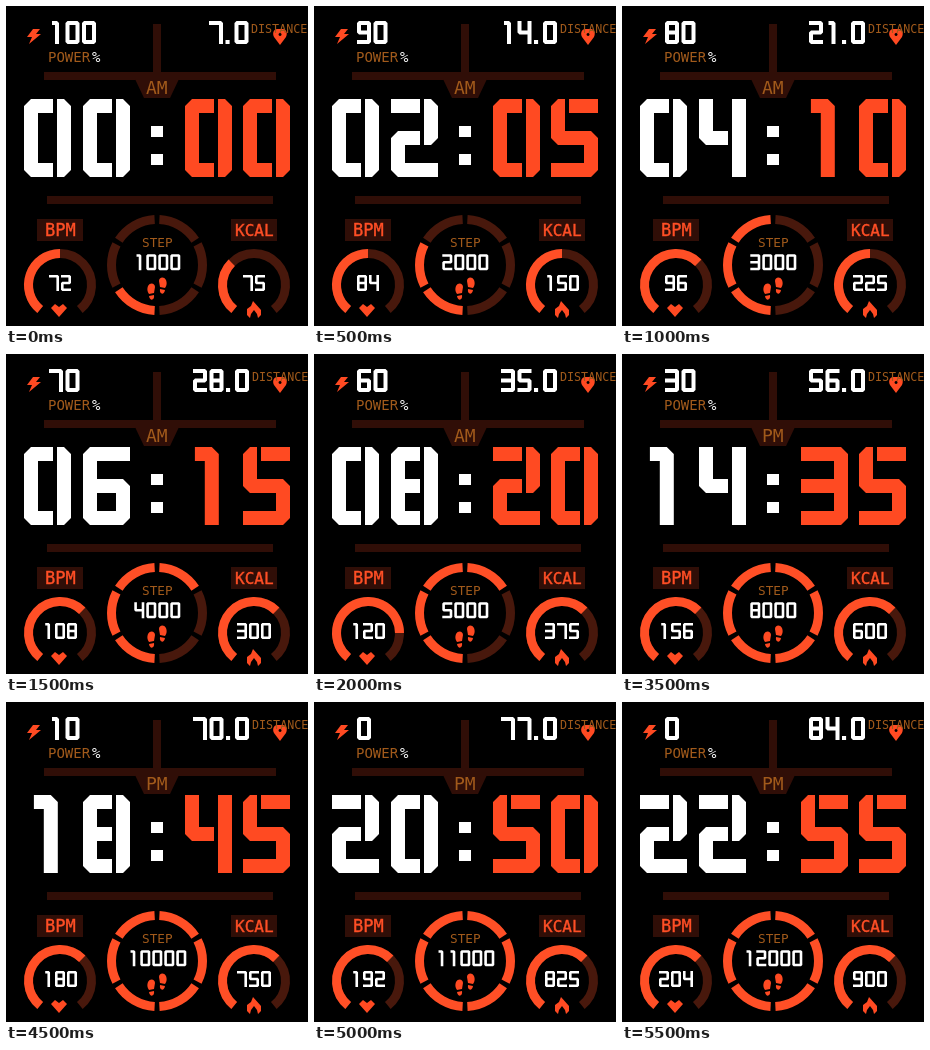
These frames come from a looping animation (302x320 px, 6 s). An HTML page:

```html
<!DOCTYPE html>
<html lang="en">
<head>
<meta charset="utf-8">
<title>Watch face</title>
<style>
html, body { margin: 0; width: 100%; height: 100%; overflow: hidden; background: #000; }
svg { display: block; width: 302px; height: 320px; }
text { font-family: "DejaVu Sans Mono", "Noto Sans Mono", monospace; fill: #a15a1b; }
.tag { fill: #ff4f26; stroke: #ff4f26; stroke-width: .4px; }
.ink { fill: none; stroke-linecap: square; stroke-linejoin: bevel; }
.arc { fill: none; stroke-width: 9; }
</style>
</head>
<body>
<svg id="face" viewBox="0 0 302 320" role="img">
  <g fill="#300e07">
    <path d="M147 18h8v48h-8zM38 66h232v8H38zM41 190h226v8H41z"/>
    <path d="M129 73h44l-9 19h-26z"/>
    <path d="M31 213h46v22H31zM225 213h46v22h-46z"/>
  </g>
  <path fill="#fff" d="M145 120h12v11h-12zM145 148h12v11h-12z"/>
  <g id="dials"></g>
  <g fill="#ff4a22">
    <path d="M27 23h7l-4 5h5L23 38l3-7h-5z"/>
    <path fill-rule="evenodd" d="M274 39l-6-8c-2-4 0-8 3-8h6c3 0 5 4 3 8zM274 27a1.5 1.5 0 1 0 .1 0z"/>
    <path d="M45 302l4-4 4 3 4-3 4 4-8 9z"/>
    <path d="M247 295l8 9v5l-3 3-1-4-3-4-3 4-1 4-3-3v-6l4-3z"/>
    <g id="feet"><path d="M142 280c2-4 7-3 7 1l-1 6-5 1c-2-3-2-5-1-8zM143 290l5-1c1 5-4 7-5 1z"/></g>
    <use href="#feet" transform="matrix(-1 0 0 1 302 -6)"/>
  </g>
  <text x="42" y="56" font-size="14">POWER</text>
  <text x="86" y="56" font-size="14" style="fill:#fff">%</text>
  <text id="unit" y="27" font-size="11.7">DISTANCE</text>
  <text id="half" x="140" y="88" font-size="18"></text>
  <text x="136" y="241" font-size="12.7">STEP</text>
  <text class="tag" x="39" y="230" font-size="17">BPM</text>
  <text class="tag" x="229" y="230" font-size="16">KCAL</text>
  <g id="marks"></g>
</svg>
<script>
const NS = "http://www.w3.org/2000/svg";
const HOT = "#ff4f26", DIM = "#48180c", WHITE = "#fff";
const [face, dials, marks, unit, half] =
  ["face", "dials", "marks", "unit", "half"].map(id => document.getElementById(id));

// Each digit walks over six corners: 0 1 on top, 2 3 in the middle, 4 5 below.
const walks = ["0154z", "015", "013245", "0154M23", "023M15",
  "102354", "104532", "015", "0154zM23", "320154"];

function add(parent, attrs) {
  const el = document.createElementNS(NS, "path");
  for (const key in attrs) el.setAttribute(key, attrs[key]);
  return parent.appendChild(el);
}

function ink(color, width) {
  return add(marks, { class: "ink", stroke: color, "stroke-width": width });
}

function digit(ch, x, y, w, h) {
  const cols = ch === "1" ? [.3, .6] : [0, 1];
  const point = n => n === "z" ? n : `${x + cols[n % 2] * w} ${y + (n >> 1) * h / 2}`;
  return walks[ch].split("M")
    .map(walk => "M" + [...walk].map(point).join("L").replace("Lz", "z")).join("");
}

function number(text, x, y, w, h, step) {
  let d = "";
  for (const ch of text) {
    d += ch === "." ? `M${x} ${y + h}h.1` : digit(ch, x, y, w, h);
    x += ch === "." ? 9 : step;
  }
  return d;
}

function arc(cx, cy, r, from, to) {
  const at = deg => {
    const a = deg * Math.PI / 180;
    return `${cx + r * Math.sin(a)} ${cy - r * Math.cos(a)}`;
  };
  return `M${at(from)}A${r} ${r} 0 ${to - from > 180 ? 1 : 0} 1 ${at(to)}`;
}

function gauge(cx) {
  const reach = 141;
  add(dials, { class: "arc", stroke: DIM, d: arc(cx, 279, 31.5, -reach, reach) });
  const bar = add(dials, { class: "arc", stroke: HOT });
  return level => bar.setAttribute("d", arc(cx, 279, 31.5, -reach, level * 45 - 135));
}

function value(cx, y) {
  const el = ink(WHITE, 2.6);
  return n => {
    const text = String(n);
    el.setAttribute("d", number(text, cx - (text.length * 12 - 4.6) / 2, y, 7.4, 13.5, 12));
  };
}

// A clock digit is cut by a thin slit beside one of its uprights.
function clockDigit(x, color) {
  const body = ink(color, 14);
  const slit = add(marks, { stroke: "#000", "stroke-width": 4 });
  return ch => {
    const cut = "08".includes(ch) ? 78 : "24".includes(ch) ? 47 : ch === "5" ? 32 : 0;
    body.setAttribute("d", digit(ch, x + 7, 100, 33, 64));
    slit.setAttribute("d", `M${x + (ch === "5" ? 16 : 31)} 93v${cut}`);
  };
}

const power = ink(WHITE, 4), distance = ink(WHITE, 4);
const setBpm = value(54, 270.3), setKcal = value(248, 270.3), setSteps = value(151.3, 249.5);
const bpmBar = gauge(54), kcalBar = gauge(248);
const ring = Array.from({ length: 6 }, (_, i) =>
  add(dials, { class: "arc", d: arc(151, 259, 45.5, 183 + i * 60, 237 + i * 60) }));
const clock = [18, 77, 179, 237].map((x, i) => clockDigit(x, i < 2 ? WHITE : "#ff4a22"));

function show(k) {
  const n = k + 1, bpm = 72 + 12 * k, kcal = 75 * n, steps = 1000 * n;
  const charge = Math.max(0, 100 - 10 * k);
  const time = String(k * 2).padStart(2, "0") + String(k * 5).padStart(2, "0");
  const noon = k < 6 ? "AM" : "PM";
  const km = (7 * n).toFixed(1);

  clock.forEach((set, i) => set(time[i]));
  half.textContent = noon;
  power.setAttribute("d", number(String(charge), 45, 17, 10, 19, 16.5));
  distance.setAttribute("d", number(km, k ? 189 : 205, 17, 10, 19, 16.5));
  unit.setAttribute("x", k ? 246 : 245);
  setBpm(bpm);
  setKcal(kcal);
  setSteps(steps);
  bpmBar(bpm < 132 ? Math.floor(bpm / 24) : 4);
  kcalBar(Math.min(4, 2 + Math.floor(kcal / 150)));
  const lit = Math.round(steps * 7 / 8000);
  ring.forEach((el, i) => el.setAttribute("stroke", i < lit ? HOT : DIM));
  face.setAttribute("aria-label",
    `${time.slice(0, 2)}:${time.slice(2)} ${noon}, power ${charge}%, distance ${km}, ` +
    `BPM ${bpm}, step ${steps}, kcal ${kcal}`);
}

let start = null, last = -1;
function tick(now) {
  if (start === null) start = now;
  const k = Math.floor((now - start) % 6000 / 500);
  if (k !== last) show(last = k);
  requestAnimationFrame(tick);
}
show(0);
requestAnimationFrame(tick);
</script>
</body>
</html>
```
